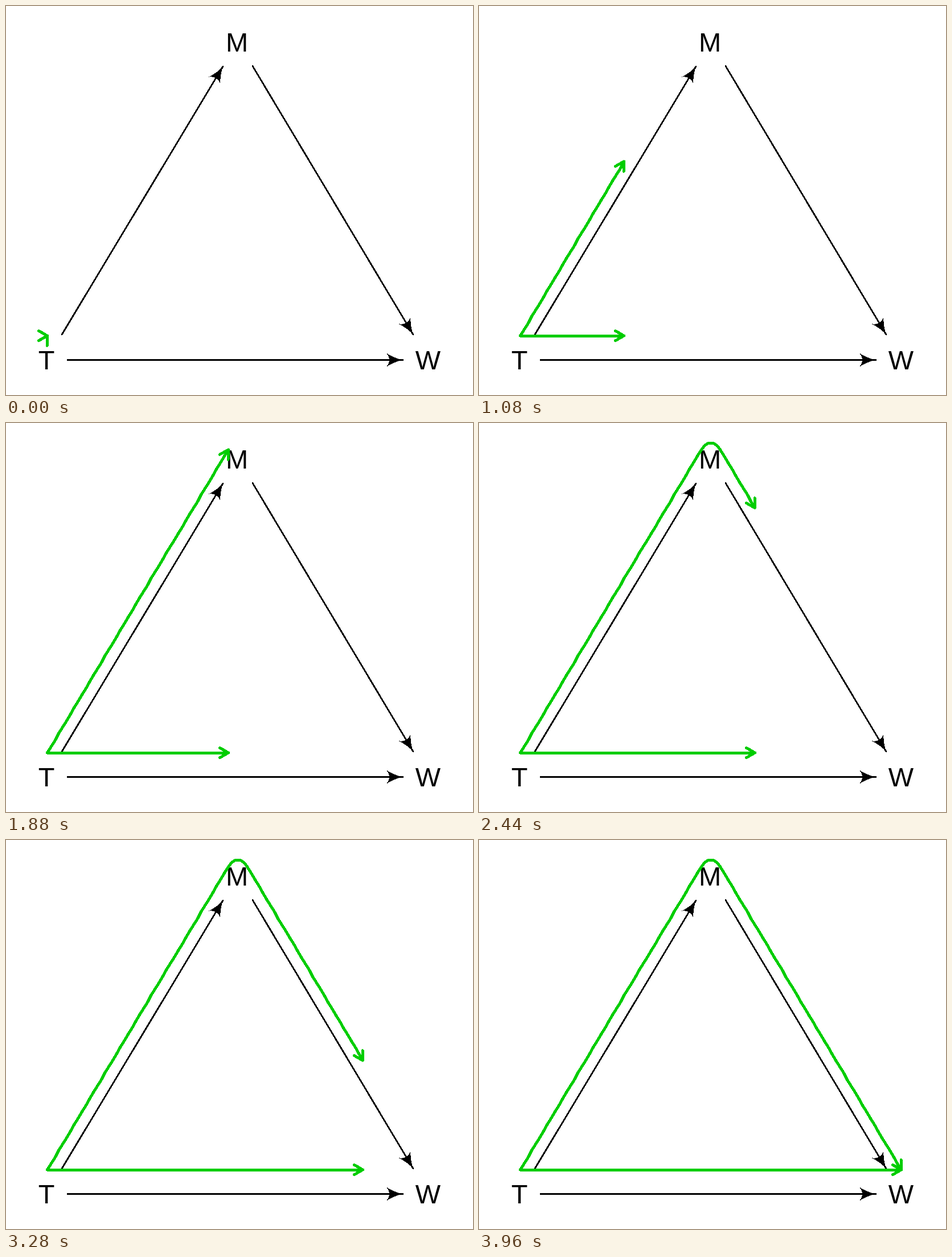
An HTML page for the animation above (4 s loop, 820x683 px).

```html
<!DOCTYPE html>
<html lang="en">
<head>
<meta charset="utf-8">
<title>Two paths from T to W</title>
<style>
  html, body { margin: 0; width: 100%; height: 100%; overflow: hidden; background: #fff; }
  svg { display: block; width: 820px; height: 683px; }
  text { font: 47px "Liberation Sans", Arial, sans-serif; text-anchor: middle; }
  .edge { stroke: #000; stroke-width: 2.8; stroke-linecap: round; }
  .flow { fill: none; stroke: #00cd00; stroke-width: 5; stroke-linecap: round; stroke-linejoin: round; }
  .edge, .flow, .head { shape-rendering: crispEdges; }
</style>
</head>
<body>
<svg viewBox="0 0 820 683">
  <g id="edges"></g>
  <text x="405.5" y="79.5">M</text>
  <text x="71" y="638">T</text>
  <text x="741" y="638">W</text>
  <path id="direct" class="flow"/>
  <path id="indirect" class="flow"/>
</svg>
<script>
const STEPS = 100, STEP_MS = 40;
const START_X = 72.5, STEP_X = 6.758, BASE_Y = 579;
const APEX = { x: 407, y: 35, round: 19.5, slope: 1.676 };
const BARB = { length: 17.3, angle: Math.PI / 6 };

const edges = [
  [98, 577, 381, 106],
  [433, 105.5, 715, 577],
  [108, 621.5, 697, 621.5]
];
document.getElementById('edges').innerHTML = edges.map(([x1, y1, x2, y2]) => {
  const turn = Math.atan2(y2 - y1, x2 - x1) * 180 / Math.PI;
  return `<line class="edge" x1="${x1}" y1="${y1}" x2="${x2}" y2="${y2}"/>
    <path class="head" transform="translate(${x2} ${y2}) rotate(${turn})"
      d="M0 0Q-15 -3 -29 -12Q-19 0 -29 12Q-15 3 0 0Z"/>`;
}).join('');

const stepX = k => START_X + STEP_X * k;

// Two straight flanks joined by a parabola around the apex.
function roofY(x) {
  const d = Math.abs(x - APEX.x), { y, round, slope } = APEX;
  return d < round
    ? y + slope * d * d / (2 * round)
    : y + slope * (d - round / 2);
}

// Points snap to whole pixels, which gives the line its slight wobble.
const snapped = x => [Math.floor(x) + 0.5, Math.round(roofY(x))];
const roof = Array.from({ length: STEPS }, (_, k) => snapped(stepX(k)));

function arrowHead([x, y], angle) {
  const barb = side => {
    const a = angle + Math.PI + side * BARB.angle;
    return `${x + BARB.length * Math.cos(a)} ${y + BARB.length * Math.sin(a)}`;
  };
  return `M${barb(1)}L${x} ${y}L${barb(-1)}`;
}

function draw(k) {
  const tip = roof[k];
  const from = stepX(Math.max(k, 1) - 1);
  const heading = Math.atan2(roofY(from + STEP_X) - roofY(from), STEP_X);
  direct.setAttribute('d',
    `M${START_X} ${BASE_Y}H${tip[0]}` + arrowHead([tip[0], BASE_Y], 0));
  indirect.setAttribute('d',
    'M' + roof.slice(0, k + 1).join('L') + arrowHead(tip, heading));
}

const direct = document.getElementById('direct');
const indirect = document.getElementById('indirect');
const began = performance.now();

function tick() {
  draw(Math.floor((performance.now() - began) / STEP_MS) % STEPS);
  requestAnimationFrame(tick);
}
tick();
</script>
</body>
</html>
```
